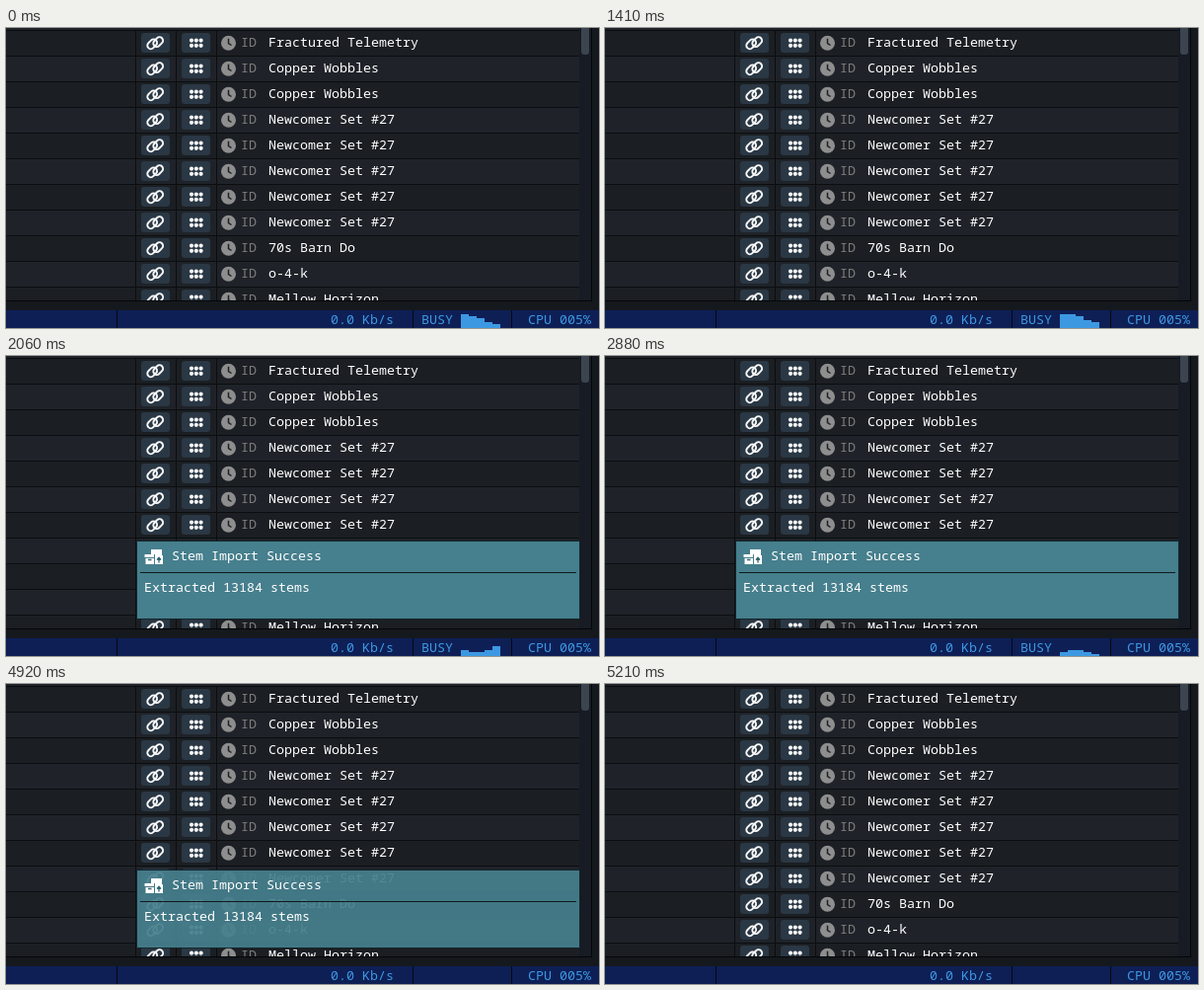
Write an HTML page that moves like this. It is 601 px wide and 304 px high and loops after 5.39 s.

```html
<!DOCTYPE html>
<html lang="en">
<head>
<meta charset="utf-8">
<title>Stem import</title>
<style>
  html, body { margin: 0; width: 100%; height: 100%; overflow: hidden; background: #15181c; }
  svg { display: block; width: 601px; height: 304px; }
  text { font: 13.333px "Noto Sans Mono", "DejaVu Sans Mono", monospace; white-space: pre; fill: #fff; }
  .dim { fill: #7c7c7c; }
  .status text, #bars { fill: #3d98e2; }
</style>
</head>
<body>
<svg viewBox="0 0 601 304">
  <defs>
    <clipPath id="listArea"><rect width="581" height="276"/></clipPath>
    <rect id="link" x="-5.5" y="-3.5" width="11" height="7" rx="3.5"/>
    <g id="cells">
      <g fill="#2a3744">
        <rect x="137" y="5" width="29" height="20" rx="3"/>
        <rect x="178" y="5" width="29" height="20" rx="3"/>
      </g>
      <g fill="none" stroke="#f8f8f8" stroke-width="1.9">
        <use href="#link" transform="translate(148.2 16.3) rotate(-45)"/>
        <use href="#link" transform="translate(154.2 14.1) rotate(-45)"/>
      </g>
      <path d="M188 12.6h.01m4.790 0h.01m4.790 0h.01M188 17.800h.01m4.790 0h.01m4.790 0h.01"
        stroke="#f8f8f8" stroke-width="4.2" stroke-linecap="round"/>
      <circle cx="225.5" cy="15.3" r="7.5" fill="#8e8e8e"/>
      <path d="M225.5 10.8V15.5L228.5 17.5" fill="none" stroke="#1c2024" stroke-width="1.5"/>
      <text class="dim" x="238" y="19">ID</text>
    </g>
  </defs>

  <rect width="601" height="304" fill="#15181c"/>
  <g id="list" clip-path="url(#listArea)"></g>
  <rect x="581" width="13" height="276" fill="#171b24"/>
  <rect x="583" y="-8" width="8" height="35" rx="3" fill="#3b444f"/>
  <path d="M0 276.5H594M593.5 0V276" stroke="#050607"/>

  <g class="status">
    <rect y="286" width="601" height="18" fill="#0e1f56"/>
    <path d="M112.5 286V304M412.5 286V304M512.5 286V304" stroke="#05070f"/>
    <text x="329" y="300">0.0 Kb/s</text>
    <text x="421" y="300" id="busy">BUSY</text>
    <text x="529" y="300">CPU 005%</text>
  </g>
  <path id="bars"/>

  <g id="toast">
    <rect id="toastPanel" x="132.5" y="187.5" width="449" height="79" fill="#467f8d" stroke="#14282e"/>
    <path d="M147 196H158V202H159V211H151V201H147ZM140.500 201H150V204H140.500ZM141.500 205H150V211H141.500Z" fill="#fff"/>
    <path d="M155 209.500V204.500M153 206.500L155 204.300L157 206.500M144 206.500H147.500"
      fill="none" stroke="#2f6470" stroke-width="1.3"/>
    <text x="168" y="207">Stem Import Success</text>
    <path d="M136 219.500H578" stroke="#10191d"/>
    <text x="140" y="239">Extracted 13184 stems</text>
  </g>
</svg>
<script>
const LOOP = 5390, FADE = 300, TOAST_IN = 1620, TOAST_OUT = 4900;
const BUSY_DECAY = 1700, BUSY_END = 3650, ROW_HEIGHT = 26;
const titles = [
  "Fractured Telemetry", "Copper Wobbles", "Copper Wobbles",
  ...Array(5).fill("Newcomer Set #27"),
  "70s Barn Do", "o-4-k", "Mellow Horizon"
];

const byId = id => document.getElementById(id);
const clamp = v => Math.min(1, Math.max(0, v));
const [bars, busy, toast, panel] = ["bars", "busy", "toast", "toastPanel"].map(byId);

byId("list").innerHTML = '<rect width="581" height="3" fill="#1f2329"/>' +
  titles.map((title, i) => `
    <g transform="translate(0 ${i * ROW_HEIGHT})">
      <rect y="2" width="581" height="26" fill="${i % 2 ? "#1f2329" : "#1b1f23"}"/>
      <path d="M0 2.5H581M131.500 2V28M172.500 2V28M213.500 2V28" stroke="#0b0d0f"/>
      <use href="#cells"/>
      <text x="266" y="19">${title}</text>
    </g>`).join("");

const setVisible = (node, on) => node.setAttribute("visibility", on ? "visible" : "hidden");

// Five block columns quantised to 2 px levels, with a travelling wave that dies away.
function drawBusy(t) {
  const strength = clamp((BUSY_END - t) / (BUSY_END - BUSY_DECAY));
  let path = "";
  for (let i = 0; i < 5; i++) {
    const wave = 4.6 + 2.5 * Math.cos(t * 0.004 + i * Math.PI / 4);
    const height = 2 * Math.round(wave * strength);
    if (height) path += `M${461 + i * 8} 304v${-height}h8v${height}z`;
  }
  bars.setAttribute("d", path);
  setVisible(busy, t < BUSY_END);
}

// Only the panel fades; its text and icon stay solid while it slides.
function drawToast(t) {
  const shown = clamp((t - TOAST_IN) / FADE) * clamp((TOAST_OUT + FADE - t) / FADE);
  toast.setAttribute("transform", `translate(0 ${Math.round(10 * (1 - shown))})`);
  panel.setAttribute("opacity", shown);
  setVisible(toast, shown > 0);
}

const start = performance.now();
function frame() {
  const t = (performance.now() - start) % LOOP;
  drawBusy(t);
  drawToast(t);
  requestAnimationFrame(frame);
}
frame();
</script>
</body>
</html>
```
